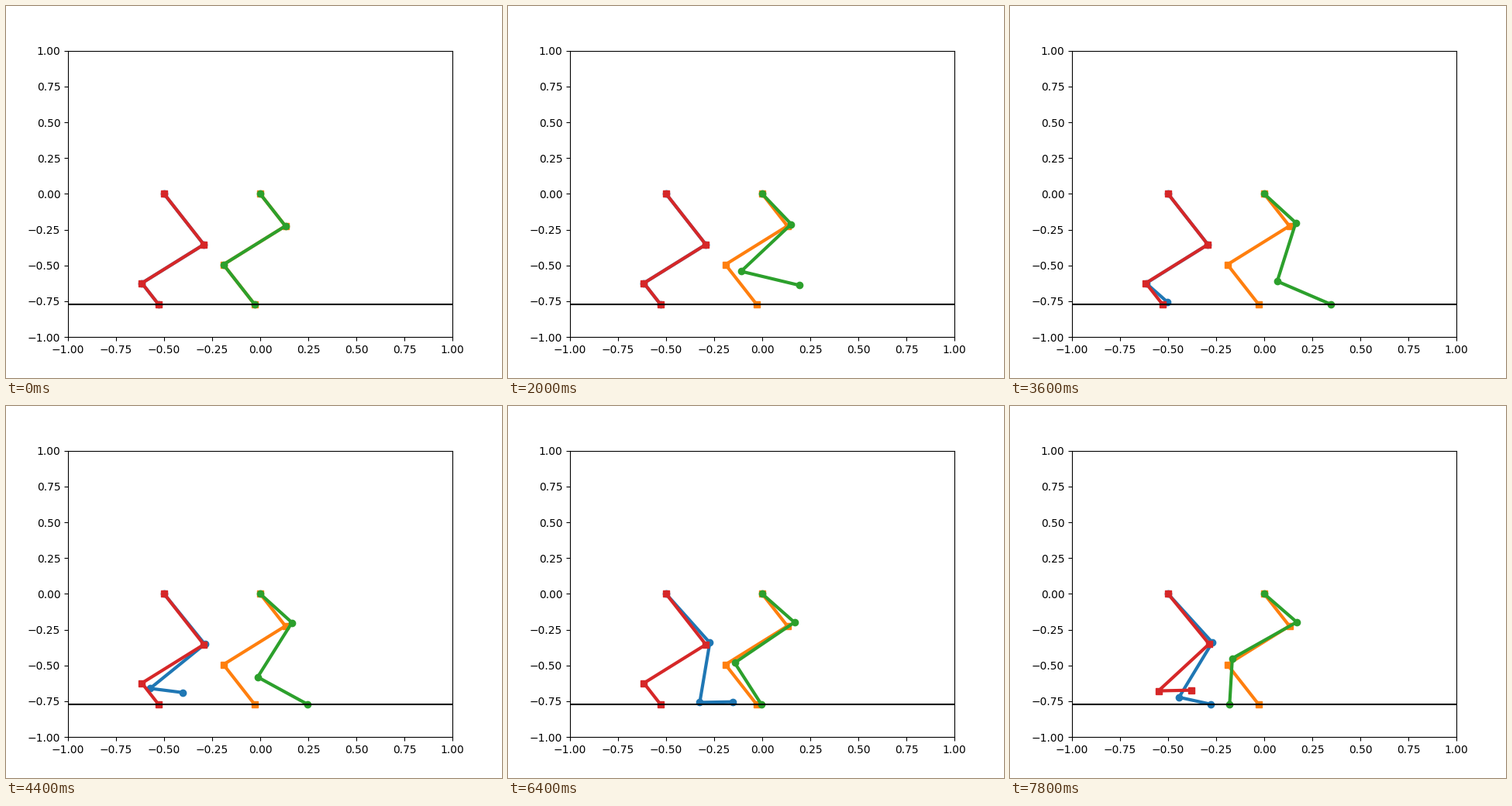
A matplotlib script that plays this animation: 640x480 px, repeating every 8 s.

```python
import numpy as np
import matplotlib.pyplot as plt
from matplotlib.animation import FuncAnimation

STEP_MS, FRAMES = 200, 40
GROUND = -0.77
SWING = 16        # frames one leg spends in the air
SPEED = 0.025     # foot travel per frame
REST_X = -0.03    # resting foot, relative to the hip
REST_ANGLE = -59.7

# link lengths, lift height and thigh swing in degrees
FORE = dict(lengths=(0.41, 0.42, 0.17), lift=0.13, sweep=3.4)
HIND = dict(lengths=(0.26, 0.42, 0.32), lift=0.15, sweep=8.8)


def polar(length, angle):
    return length * np.array([np.cos(angle), np.sin(angle)])


def ankle_pos(knee, foot, shin, heel):
    """Two-link solution that bends backwards."""
    dx, dy = foot - knee
    dist = np.hypot(dx, dy)
    bend = np.arccos((shin**2 + dist**2 - heel**2) / (2 * shin * dist))
    return knee + polar(shin, np.arctan2(dy, dx) - bend)


class Leg:
    def __init__(self, ax, hip, turn, color, marker, lengths, lift, sweep):
        self.hip = np.array([hip, 0.0])
        self.start = 1 + SWING * turn
        self.lengths, self.lift, self.sweep = lengths, lift, sweep
        self.line, = ax.plot([], [], color=color, marker=marker, lw=3)

    def pose(self, frame):
        thigh, shin, heel = self.lengths
        age = max(frame - self.start, 0)
        air = min(age, SWING)
        stance = age - air
        u = air / SWING

        # the foot swings forward in a tent shape, then slides back
        height = self.lift * (1 - abs(2 * u - 1))
        foot = self.hip + [REST_X + SPEED * (air - stance), GROUND + height]
        angle = REST_ANGLE + self.sweep * u * u * (3 - 2 * u) + 0.07 * stance
        knee = self.hip + polar(thigh, np.radians(angle))
        ankle = ankle_pos(knee, foot, shin, heel)
        self.line.set_data(*np.transpose([self.hip, knee, ankle, foot]))
        return self.line


fig, ax = plt.subplots(figsize=(6.4, 4.8), dpi=100)
ax.set_xlim(-1, 1)
ax.set_ylim(-1, 1)

legs = [
    Leg(ax, -0.5, 1, "C0", "o", **FORE),
    Leg(ax, 0, 3, "C1", "s", **HIND),
    Leg(ax, 0, 0, "C2", "o", **HIND),
    Leg(ax, -0.5, 2, "C3", "s", **FORE),
]
ax.plot([-1, 1], [GROUND, GROUND], color="black")


def update(frame):
    return [leg.pose(frame) for leg in legs]


anim = FuncAnimation(fig, update, frames=FRAMES, interval=STEP_MS,
                     repeat=True, repeat_delay=0)
plt.show()
```
